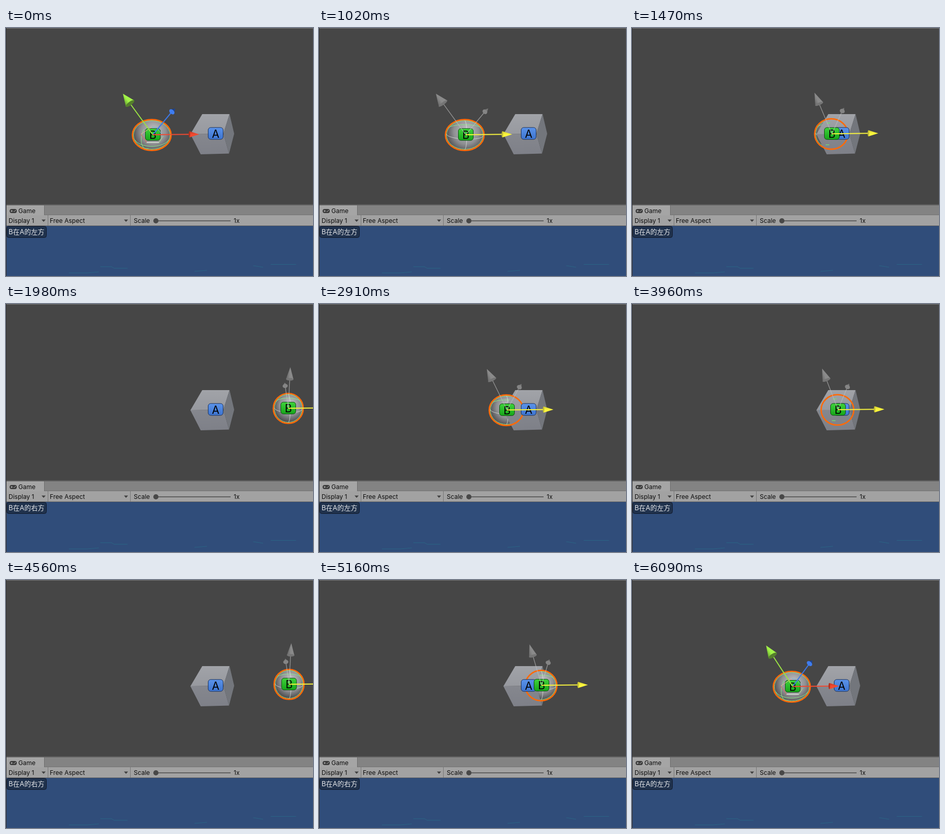
Write an HTML page with a canvas that moves like this. It is 596 px wide and 481 px high and loops after 6.18 s.

```html
<!DOCTYPE html>
<html lang="zh">
<head>
<meta charset="utf-8">
<style>
html, body { margin: 0; width: 100%; height: 100%; overflow: hidden; background: #464646; }
canvas { display: block; }
</style>
</head>
<body>
<canvas id="stage" width="596" height="481"></canvas>
<script>
const c = document.getElementById('stage').getContext('2d');
const LOOP = 6180, STEP = 30;
const UI = '12px Inter, sans-serif';

// [time, x of ball B]
const track = [
  [0, 285], [1140, 285], [1470, 388], [1770, 502], [1980, 548], [2310, 548],
  [2910, 365], [3420, 283], [3750, 283], [3960, 400], [4380, 510],
  [4560, 549.5], [4680, 552], [4860, 552], [5460, 312], [LOOP, 312]
];

const slope = i => (track[i + 1][1] - track[i][1]) / (track[i + 1][0] - track[i][0]);

function tangent(i) {
  if (i < 1 || i > track.length - 2) return 0;
  const a = slope(i - 1), b = slope(i);
  return a * b > 0 ? 2 * a * b / (a + b) : 0;
}

// Monotone cubic through the track points
function ballX(t) {
  const i = track.findIndex((p, n) => t < track[n + 1][0]);
  const [t0, x0] = track[i], [t1, x1] = track[i + 1];
  const h = t1 - t0, u = (t - t0) / h, v = 1 - u;
  return x0 * (1 + 2 * u) * v * v + tangent(i) * h * u * v * v
       + x1 * u * u * (3 - 2 * u) - tangent(i + 1) * h * u * u * v;
}

function rect(x, y, w, h, fill) {
  c.fillStyle = fill;
  c.fillRect(x, y, w, h);
}

function poly(points, fill) {
  c.beginPath();
  points.forEach(p => c.lineTo(...p));
  c.closePath();
  c.fillStyle = fill;
  c.fill();
}

function line(color, width, ...points) {
  c.beginPath();
  points.forEach(p => c.lineTo(...p));
  c.strokeStyle = color;
  c.lineWidth = width;
  c.stroke();
}

function oval(x, y, rx, ry, angle = 0, from = 0, to = 2 * Math.PI) {
  c.beginPath();
  c.ellipse(x, y, rx, ry, angle, from, to);
}

function box(x, y, w, h, r, fill, edge) {
  c.beginPath();
  c.roundRect(x, y, w, h, r);
  c.fillStyle = fill;
  c.fill();
  c.strokeStyle = edge;
  c.lineWidth = 1;
  c.stroke();
}

function text(s, x, y, font = UI, color = '#0c0c0c', align = 'left') {
  c.font = font;
  c.fillStyle = color;
  c.textAlign = align;
  c.fillText(s, x, y);
}

function fade(x0, y0, x1, y1, ...colors) {
  const g = c.createLinearGradient(x0, y0, x1, y1);
  colors.forEach((s, i) => g.addColorStop(i / (colors.length - 1), s));
  return g;
}

function cone(tx, ty, bx, by, half, depth, light, dark, base) {
  const a = Math.atan2(ty - by, tx - bx);
  const dx = -Math.sin(a) * half, dy = Math.cos(a) * half;
  poly([[tx, ty], [bx + dx, by + dy], [bx - dx, by - dy]],
    fade(bx + dx, by + dy, bx - dx, by - dy, light, light, dark));
  oval(bx, by, depth, half, a);
  c.fillStyle = base;
  c.fill();
}

function badge(letter, x, y, top, bottom, edge) {
  box(x - 14.5, y - 12, 29, 23, 5, fade(0, y - 12, 0, y + 11, top, bottom), edge);
  text(letter, x, y + 8, '21px Inter, sans-serif', '#000', 'center');
}

function cube() {
  poly([[381, 167], [434, 167], [422, 205], [358, 206]], fade(0, 167, 0, 206, '#a1a3a8', '#97999f'));
  poly([[358, 206], [422, 205], [433, 243.5], [378, 245]], fade(0, 206, 0, 245, '#85878e', '#7e8088'));
  poly([[434, 167], [443, 205], [433, 243.5], [422, 205]], '#73767c');
}

function ball(b) {
  const { cx, cy, rx, ry, drag } = b;
  c.save();
  oval(cx, cy, rx, ry);
  c.clip();
  const g = c.createRadialGradient(cx + 4, cy - 10, 2, cx + 2, cy - 4, rx + 5);
  g.addColorStop(0, '#bdbdc1');
  g.addColorStop(.55, '#8f9093');
  g.addColorStop(1, '#3d3d40');
  c.fillStyle = g;
  c.fillRect(cx - rx, cy - ry, 2 * rx, 2 * ry);
  c.lineWidth = 1;
  c.strokeStyle = '#8be68b';
  oval(cx, cy, rx - 2, ry - 2);
  c.stroke();
  if (drag) {
    oval(cx, cy - 13, rx - 6, 7, 0, Math.PI, 2 * Math.PI);
    c.stroke();
    c.strokeStyle = 'rgba(230,235,230,.7)';
    oval(cx, cy, rx - 2, 8, .05, 0, Math.PI);
    c.stroke();
    oval(cx, cy, 4, ry - 2, 0, -Math.PI / 2, Math.PI / 2);
    c.stroke();
  } else {
    oval(cx, cy + 4, rx - 3, 18, 0, .3, Math.PI - .3);
    c.stroke();
    oval(cx - 4, cy, 15, ry - 2, .3, 1.2, 3.4);
    c.stroke();
  }
  c.restore();
}

// Where the ball pokes out of the cube's right face
function ballThroughFace(b) {
  const d = 433 - b.x;
  if (d > 30) return;
  c.save();
  if (d > -34) {
    c.beginPath();
    c.rect(433, 100, 163, 200);
    const r = Math.sqrt(Math.max(0, 900 - d * d));
    c.ellipse(433, 205, r / 4, r, 0, 0, 2 * Math.PI);
    c.clip();
  }
  ball(b);
  c.restore();
}

function handles(x, y) {
  const p = [[-2, -15], [-23, -1], [-12, 15], [12, 15], [20, 3], [8, -14]].map(q => [x + q[0], y + q[1]]);
  line('#f0a59a', 1, p[0], p[1]);
  line('#e8604c', 1, p[1], p[2]);
  line('#eef5ea', 1.3, p[2], p[3]);
  line('#a9e88d', 1, p[3], p[4]);
  line('#6fb5d8', 1, p[4], p[5], p[0]);
}

function gizmo({ x, y, k, drag }, hover) {
  const top = [x + 4 - 62 * k, 122.5 + 5 * k];
  const len = Math.hypot(top[0] - x, top[1] - y);
  const f = 1 - 23.5 / len;
  const neck = [x + (top[0] - x) * f, y + (top[1] - y) * f];
  const far = [x - 6 + 43 * k, 159 + 3.5 * k];
  const farTip = [far[0] - 1 + 7.5 * k, far[1] - 6.5];
  const half = 7.3 + 2.8 * k * k;
  const grey = 'rgba(190,190,190,.65)';

  line(drag ? grey : '#3d78e6', drag ? 1.3 : 2, [x, y], far);
  if (drag) cone(...farTip, ...far, 5, 4, '#777', '#606060', '#858585');
  else cone(...farTip, ...far, 6, 4, '#1f438d', '#172f62', '#3f7df0');

  line(drag ? grey : '#9be443', drag ? 1.3 : 2, [x, y], neck);
  if (drag) cone(...top, ...neck, half, 2.5, '#8a8a8a', '#666', '#757575');
  else cone(...top, ...neck, half, 3.5, '#a2f348', '#5f9a2b', '#557f2c');

  const tip = x + 90, ty = y - .8;
  line(hover ? '#f6f23f' : '#ee4a32', 2, [x, y], [tip - 19, ty]);
  if (hover) cone(tip, ty, tip - 19, ty, 6, 1.5, '#fbf63c', '#d5cf30', '#c3be36');
  else cone(tip, ty, tip - 19, ty, 6, 1.5, '#f24a30', '#c73520', '#a8301f');
}

function scene(t) {
  const x = ballX(t), k = (548 - x) / 263;
  const b = {
    x, k, y: 202.3 + 4.7 * k,
    cx: x - 2 * k, cy: 202.5 + 5 * k,
    rx: 29 + 8.5 * k * k, ry: 29 + .8 * k,
    drag: t >= 1020 && t < 5460
  };
  rect(0, 0, 596, 343, '#464646');
  rect(0, 0, 596, 1, '#747474');
  if (x < 463) ball(b);
  cube();
  ballThroughFace(b);
  if (x > 385 && x < 425) {
    line('#6fe86f', 1.2, [x - 10, b.cy - 21], [x - 3, b.cy - 21.5]);
    line('#6fe86f', 1.2, [x - 12, b.cy + 21], [x - 5, b.cy + 21]);
  }
  oval(b.cx, b.cy, b.rx, b.ry);
  c.strokeStyle = '#ff6a08';
  c.lineWidth = 2.7;
  c.stroke();
  badge('A', 407, 205, '#5b93ea', '#3d74cf', '#1c3156');
  badge('B', x, b.y, '#3fd23b', '#16a51a', '#104a12');
  if (!b.drag) handles(x, b.y);
  gizmo(b, t >= 480 && t < 5580);
  return x;
}

function arrowDown(x) {
  poly([[x - 4, 371.5], [x + 4, 371.5], [x, 376]], '#404040');
}

function panel(x) {
  rect(0, 342, 596, 2, '#606060');
  rect(0, 344, 596, 19, '#838383');
  rect(0, 344, 74, 20, '#a5a5a5');
  rect(74, 344, 1, 19, '#6c6c6c');
  rect(0, 363, 596, 20, '#a2a2a2');
  rect(75, 362, 521, 1, '#747474');
  rect(0, 383, 596, 1, '#686868');
  rect(81, 363, 1, 20, '#777');
  rect(241, 363, 1, 20, '#777');

  // Gamepad
  c.beginPath();
  c.roundRect(7, 351, 14, 8, 4);
  c.fillStyle = '#3b3b3b';
  c.fill();
  rect(9, 354.5, 4, 1, '#b5b5b5');
  rect(10.5, 353, 1, 4, '#b5b5b5');
  rect(15, 355, 1.5, 1.5, '#b5b5b5');
  rect(17.5, 353.5, 1.5, 1.5, '#b5b5b5');

  text('Game', 24, 359);
  text('Display 1', 5, 378);
  text('Free Aspect', 85, 378);
  text('Scale', 248, 378);
  text('1x', 442, 378);
  arrowDown(73);
  arrowDown(233);
  rect(291, 373, 145, 2, '#606060');
  oval(291, 374, 5, 5);
  c.fillStyle = '#484848';
  c.fill();

  rect(0, 384, 596, 97, '#304d7a');
  const glint = '#2b6485';
  line(glint, 1, [183, 463], [205, 463], [210, 466], [236, 466]);
  line(glint, 1, [480, 461], [499, 464]);
  line(glint, 1, [514, 458.5], [563, 458.5]);
  line(glint, 1, [366, 472], [390, 470]);
  line(glint, 1, [122, 475], [158, 475], [180, 473]);

  box(1.5, 384.5, 77, 22, 4, '#20324d', '#10192a');
  text(`B在A的${x > 407 ? '右' : '左'}方`, 5, 400,
    '13px Inter, "Noto Sans CJK SC", "Noto Sans CJK", sans-serif', '#e4e6e9');
  rect(0, 0, 1, 481, '#2d2d2d');
}

function frame(now) {
  panel(scene(Math.floor(now % LOOP / STEP) * STEP));
  requestAnimationFrame(frame);
}
frame(0);
</script>
</body>
</html>
```
